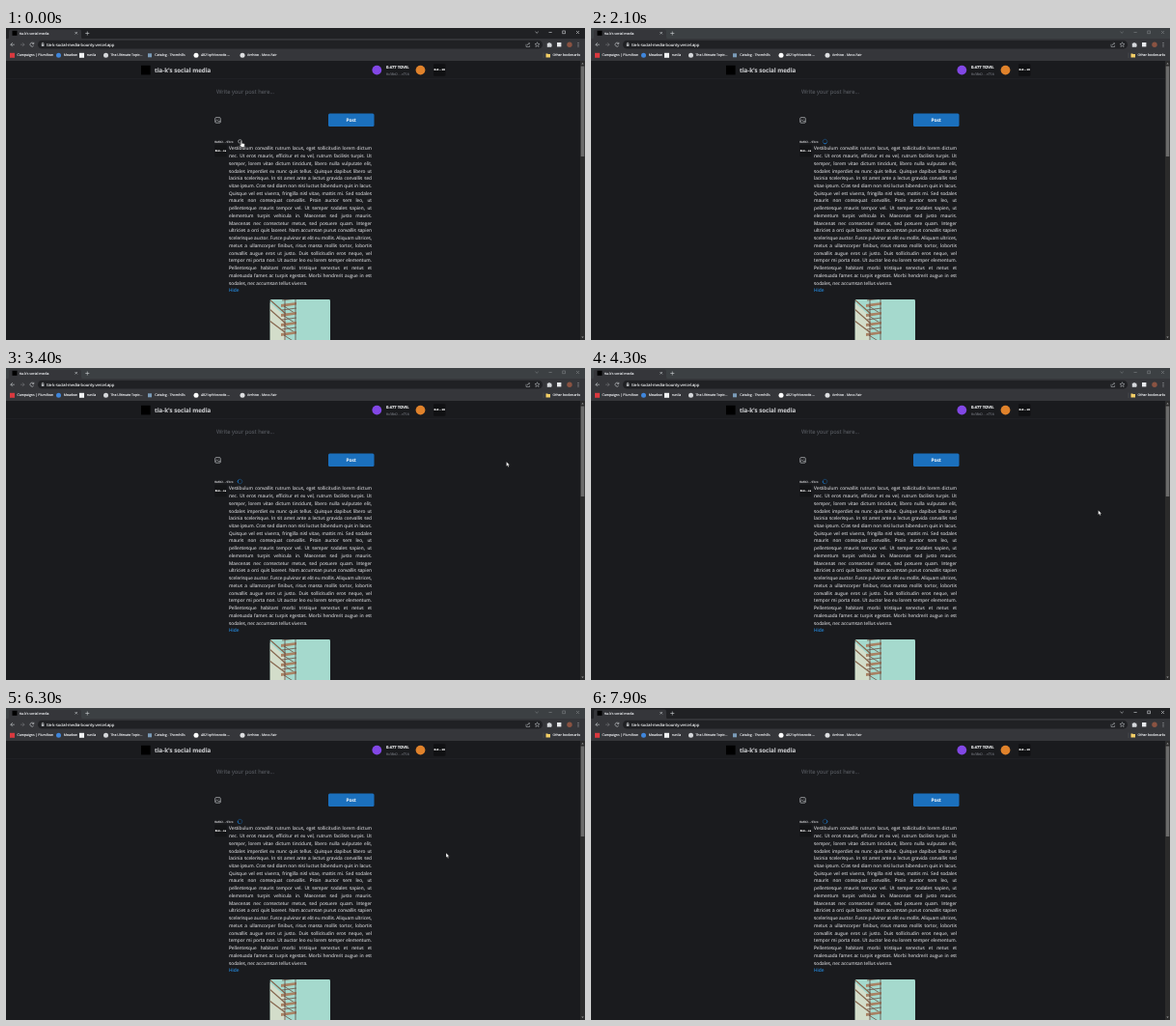
An HTML page for the animation above (8000 ms loop, 600 by 323 pixels).

```html
<!DOCTYPE html>
<html lang="en">
<head>
<meta charset="utf-8">
<title>Social media</title>
<style>
html, body { margin: 0; width: 100%; height: 100%; overflow: hidden; background: #1a1b1e; }
svg { display: block; width: 600px; height: 323px; }
text { font-family: "Open Sans", "Noto Sans", sans-serif; text-rendering: geometricPrecision; white-space: pre; stroke-width: .12; }
.mono { font-family: "DejaVu Sans Mono", "Noto Sans Mono", monospace; }
.bold { font-weight: 700; }
.semi { font-weight: 600; }
.mid { text-anchor: middle; }
.line { fill: none; stroke: #c4c7cb; stroke-width: .65; }
.soft { opacity: .75; }
</style>
</head>
<body>
<svg id="stage" viewBox="0 0 600 323">
  <!-- Browser chrome -->
  <rect id="strip" width="600" height="12"/>
  <path d="M1 11.5Q3 11.5 3 9V3.500Q3 1.500 5 1.500H76Q78 1.500 78 3.500V9Q78 11.500 80 11.500Z" fill="#35363a"/>
  <rect y="11" width="600" height="23" fill="#35363a"/>
  <rect x="6.500" y="2.800" width="5" height="5" fill="#000"/>
  <path class="line" d="M71.500 4l2.400 2.400m0-2.400l-2.400 2.400M82.300 5.500h4m-2-2v4"/>
  <g id="controls" class="line">
    <path d="M548.500 3.800l1.600 1.500 1.600-1.500M562.500 4.500h3.200M591 3l3 3m0-3l-3 3"/>
    <rect x="576.800" y="3" width="2.800" height="2.800"/>
  </g>
  <path class="line" d="M8.800 17.200H4.800m2-2l-2 2 2 2"/>
  <path class="line" d="M15 17.200h4m-2-2l2 2-2 2" opacity=".4"/>
  <path class="line" d="M28.500 15.800a2 2 0 1 0 .2 2.400M28.800 14.800v1.700h-1.700"/>
  <rect x="33" y="12.800" width="523" height="8.800" rx="4.400" fill="#202124"/>
  <rect x="36.800" y="16.800" width="2.600" height="2.100" fill="#b4b7bb"/>
  <path class="line" d="M37.300 17v-1a.8.8 0 0 1 1.600 0v1"/>
  <path class="line soft" d="M539 16.700v2.800h3.600v-1.500M540.200 18q.2-2 2.300-2m-1-1.200l1.200 1.200-1.200 1.200"/>
  <path class="line soft" d="M550.500 14.700l.7 1.700 1.800.1-1.400 1.200.5 1.800-1.600-1-1.600 1 .5-1.800-1.400-1.200 1.800-.1Z"/>
  <path d="M560.800 15.800h1.300a.9.9 0 0 1 1.800 0h1.400v1.500a.8.8 0 0 1 0 1.500v1h-4.500Z" fill="#d4d7db"/>
  <rect x="571" y="15" width="4.400" height="4.400" fill="#e8eaed"/>
  <circle cx="584" cy="17.200" r="2.700" fill="#8a5342"/>
  <g fill="#c4c7cb"><circle cx="593" cy="15.400" r=".5"/><circle cx="593" cy="17.200" r=".5"/><circle cx="593" cy="19" r=".5"/></g>

  <!-- Bookmark icons -->
  <rect x="4" y="25.800" width="5" height="5" fill="#d9393f"/>
  <circle cx="54.500" cy="28.300" r="2.500" fill="#3f86dc"/>
  <rect x="76" y="25.800" width="5" height="5" fill="#f1f3f4"/>
  <circle cx="103.500" cy="28.300" r="2.500" fill="#d5d7da"/>
  <rect x="147" y="26.300" width="4" height="4" fill="#7a9bb8"/>
  <circle cx="197" cy="28.300" r="2.500" fill="#fff"/>
  <circle cx="245" cy="28.300" r="2.500" fill="#dedfe1"/>
  <path d="M557 25.500v5.500" stroke="#5f6368" stroke-width=".4"/>
  <path d="M559.500 26.400h1.700l.6.700h2.200v3.500h-4.500Z" fill="#f3cd65"/>

  <!-- Scrollbar -->
  <rect x="595" y="34" width="5" height="289" fill="#2b2b2b"/>
  <rect x="595.700" y="39.500" width="3.600" height="93.500" fill="#6b6b6b"/>
  <path d="M596.300 37.500l1.200-1.500 1.200 1.500ZM596.300 319.500l1.200 1.500 1.200-1.500Z" fill="#9a9a9a"/>

  <!-- Page -->
  <path d="M0 52.500h595" stroke="#2c2e33" stroke-width=".35"/>
  <rect x="140" y="38.800" width="9.600" height="9.600" fill="#000"/>
  <circle cx="384.300" cy="43.600" r="4.900" fill="#8247e5"/>
  <circle cx="429.500" cy="43.600" r="4.900" fill="#e0822b"/>
  <rect x="443" y="37.300" width="12.500" height="12.500" rx="1.200" fill="#101113"/>
  <rect x="216.200" y="120.800" width="12.500" height="12.500" rx="1.200" fill="#141517"/>
  <rect x="334" y="88.500" width="47.500" height="13.500" rx="1.500" fill="#1b70bd"/>
  <rect class="line" x="216.700" y="92.600" width="5.600" height="5.600" rx="1.100"/>
  <path class="line" d="M216.900 96.800l1.700-1.600 1.700 1.600 .8-.7 1.200 1.100M220.300 94.300h.5"/>

  <!-- Photograph, reduced to flat shapes -->
  <clipPath id="frame"><rect x="273.700" y="281" width="62.300" height="50" rx="1.400"/></clipPath>
  <g clip-path="url(#frame)">
    <rect x="273" y="280" width="64" height="44" fill="#a5d9cd"/>
    <path d="M273 284l17 15v25h-17Z" fill="#d3ddca"/>
    <path d="M273 281l17 15M273 291l17 15M273 303l16 12" stroke="#86674f" stroke-width="1.300"/>
    <g id="stairs" fill="none"></g>
  </g>

  <!-- Moving parts -->
  <circle id="icon" cx="242.500" cy="117.400" r="1.800" class="line"/>
  <g id="spinner" fill="none" stroke="#1c7ed6" stroke-width=".65">
    <circle r="2.300" stroke-opacity=".5"/>
    <path d="M0-2.300A2.300 2.300 0 0 1 2.300 0"/>
  </g>
  <g id="labels"></g>
  <path id="hand" d="M243.300 117.200q.7-.7 1.200 0v2.100l2.300.5q.7.200.6 1l-.5 2.600h-2.900l-1.900-2.500q.3-.8 1.200-.1Z"
    fill="#fff" stroke="#111" stroke-width=".35"/>
  <path id="arrow" d="M0 0v4.800l1.100-1 .8 1.800.9-.4-.8-1.700h1.500Z" fill="#fff" stroke="#111" stroke-width=".3"/>
</svg>
<script>
const NS = 'http://www.w3.org/2000/svg';
const $ = id => document.getElementById(id);

function add(parent, tag, attrs) {
  const el = document.createElementNS(NS, tag);
  for (const key in attrs) el.setAttribute(key, attrs[key]);
  return parent.appendChild(el);
}

function label(x, y, size, text, fill = '#c6c7ca', cls = '') {
  const el = add($('labels'), 'text', { x, y, fill, stroke: fill, 'font-size': size, class: cls });
  el.textContent = text;
  return el;
}

label(14, 6.7, 3.5, "tia-k's social media", '#e8eaed');
label(42, 18.6, 4.2, 'tia-k-social-media-bounty.vercel.app', '#f1f3f4');

const bookmarks = [
  [11.5, 'Campaigns | PlumRow'], [59.8, 'Meadow'], [83.8, 'runila'],
  [108.3, 'The Ultimate Topic...'], [154.3, 'Catalog - Thornhills'],
  [202, '4821qrlt/vscode-...'], [250, 'Archive - Moss Fair'], [566.5, 'Other bookmarks']
];
for (const [x, name] of bookmarks) label(x, 29.4, 3.5, name, '#eceef1');

label(154, 45.9, 6.15, "tia-k's social media", '#c6c7ca', 'bold');
label(394, 42.1, 4.15, '0.477 TOVIL', '#f1f2f3', 'bold');
label(394, 48.5, 3.3, '0x3Bd2..c718', '#686b72', 'mono');
label(449.2, 44.4, 2.7, '0x3..18', '#fff', 'mono bold mid');
label(218, 68.3, 5.8, 'Write your post here...', '#55585e');
label(357.6, 97.1, 4.9, 'Post', '#fff', 'semi mid');
label(216.2, 118.9, 2.95, '0x4b2..93ce', '#c6c7ca', 'mono');
label(222.4, 127.7, 2.7, '0x4..ce', '#fff', 'mono bold mid');
label(231, 273.3, 4.8, 'Hide', '#2587d8');

const post = `Vestibulum convallis rutrum lacus, eget sollicitudin lorem dictum
nec. Ut eros mauris, efficitur et ex vel, rutrum facilisis turpis. Ut
semper, lorem vitae dictum tincidunt, libero nulla vulputate elit,
sodales imperdiet ex nunc quis tellus. Quisque dapibus libero ut
lacinia scelerisque. In sit amet ante a lectus gravida convallis sed
vitae ipsum. Cras sed diam non nisi luctus bibendum quis in lacus.
Quisque vel est viverra, fringilla nisl vitae, mattis mi. Sed sodales
mauris non consequat convallis. Proin auctor sem leo, ut
pellentesque mauris tempor vel. Ut semper sodales sapien, ut
elementum turpis vehicula in. Maecenas sed justo mauris.
Maecenas nec consectetur metus, sed posuere quam. Integer
ultricies a orci quis laoreet. Nam accumsan purus convallis sapien
scelerisque auctor. Fusce pulvinar at elit eu mollis. Aliquam ultrices,
metus a ullamcorper finibus, risus massa mollis tortor, lobortis
convallis augue eros ut justo. Duis sollicitudin eros neque, vel
tempor mi porta non. Ut auctor leo eu lorem semper elementum.
Pellentesque habitant morbi tristique senectus et netus et
malesuada fames ac turpis egestas. Morbi hendrerit augue in est
sodales, nec accumsan tellus viverra.`.split('\n');

// Justify every line but the last to the column width.
post.forEach((text, i) => {
  const el = label(231, 126.3 + i * 7.74, 4.75, text);
  if (i === post.length - 1) return;
  const gaps = text.split(' ').length - 1;
  el.style.wordSpacing = (148 - el.getComputedTextLength()) / gaps + 'px';
});

// Fire escape: stacked landings joined by short flights.
for (let y = 285; y < 325; y += 10) {
  add($('stairs'), 'path', { d: `M285 ${y + 1}L301 ${y - 1}v2.400L285 ${y + 4}Z`, fill: '#a98264' });
  add($('stairs'), 'path', { d: `M288 ${y + 3}l11 7M286 ${y - 3}l15-2`, stroke: '#6f5346', 'stroke-width': .8 });
}
add($('stairs'), 'path', { d: 'M289 281v43M300 281v43', stroke: '#5c473f', 'stroke-width': .8 });

// Pointer path: time, x, y.
const path = [
  [2800, 588, 62], [3400, 518.5, 97], [3700, 519, 99], [4400, 526, 150],
  [5600, 526, 150], [6300, 456, 150], [6800, 436, 146]
];

function pointerAt(t) {
  const i = path.findIndex(p => p[0] > t);
  if (i < 1) return null;
  const [t0, x0, y0] = path[i - 1], [t1, x1, y1] = path[i];
  const u = (t - t0) / (t1 - t0), k = u * u * (3 - 2 * u);
  return [x0 + (x1 - x0) * k, y0 + (y1 - y0) * k];
}

const show = (id, on) => { $(id).style.display = on ? '' : 'none'; };

function draw(now) {
  const t = Math.floor(now % 8000 / 100) * 100;
  const focused = t < 2100 || t >= 6800;
  $('strip').setAttribute('fill', focused ? '#202124' : '#3c4043');
  $('controls').style.opacity = focused ? 1 : .45;

  const loading = t >= 300;
  show('icon', !loading);
  show('spinner', loading);
  $('spinner').setAttribute('transform', `translate(242.5 117.5) rotate(${t * .36 + 90})`);

  show('hand', t < 900);
  const pos = pointerAt(t);
  show('arrow', pos);
  if (pos) $('arrow').setAttribute('transform', `translate(${pos})`);
}

const start = performance.now();
function tick() {
  draw(performance.now() - start);
  requestAnimationFrame(tick);
}
tick();
</script>
</body>
</html>
```
